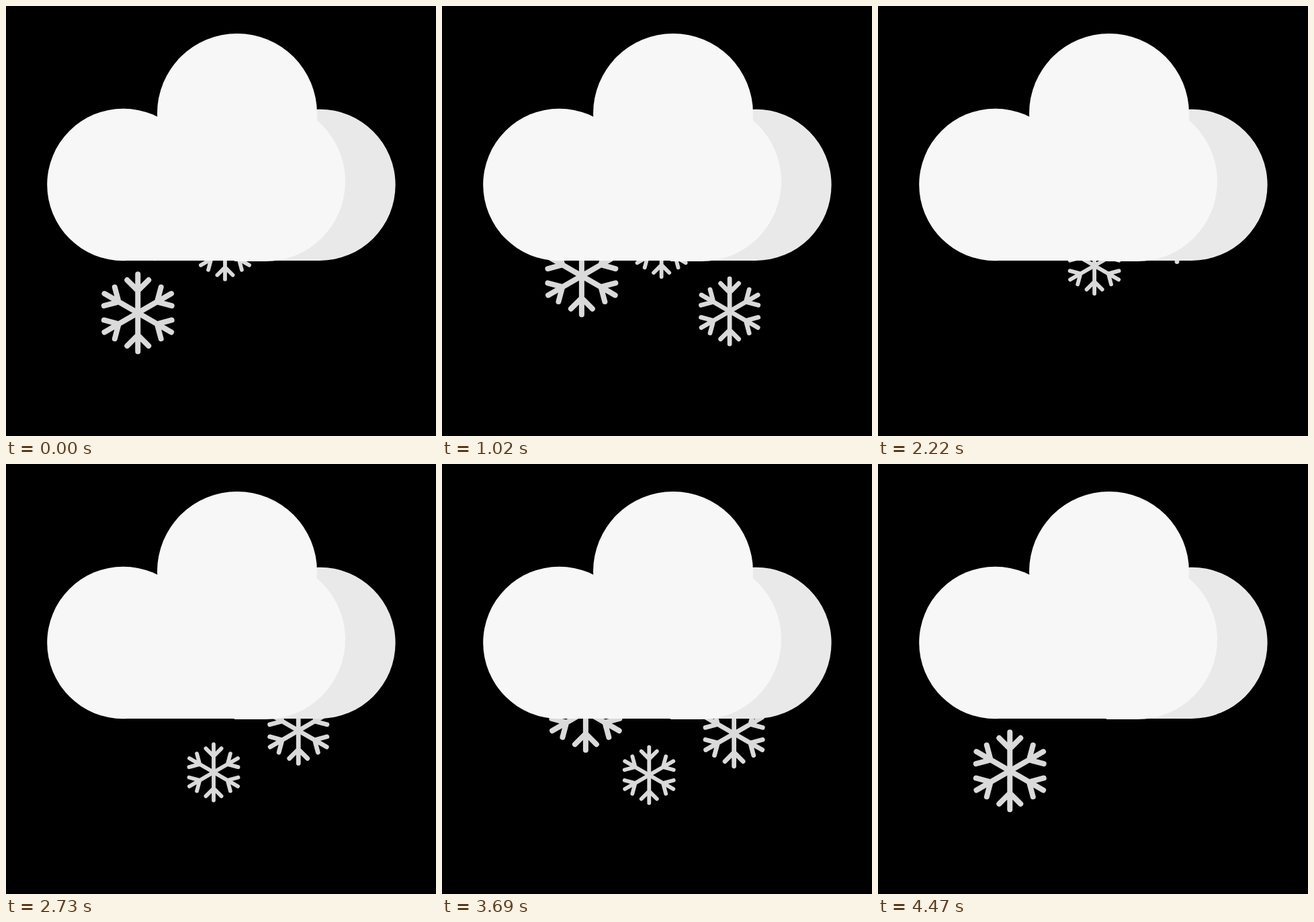
Recreate the animation shown at these times as an HTML page. Size 640 by 640 pixels, loop 4.5 s.

```html
<!DOCTYPE html>
<html>
<head>
<meta charset="utf-8">
<style>
  html, body { margin: 0; height: 100%; overflow: hidden; background: #000; }
  svg { display: block; width: 640px; height: 640px; }
</style>
</head>
<body>
<svg viewBox="0 0 640 640">
  <defs>
    <path id="arm" d="M0 0V-57.5M-16 -49L0 -33L16 -49"/>
    <g id="flake" fill="none" stroke="#dadada" stroke-width="8" stroke-linecap="round"></g>
  </defs>
  <g id="snow"></g>
  <g fill="#e9e9e9">
    <circle cx="467" cy="266.3" r="112.6"/>
    <rect x="386" y="200" width="81" height="179"/>
  </g>
  <g fill="#f7f7f7">
    <circle cx="174.5" cy="266" r="113.3"/>
    <circle cx="344" cy="160" r="119"/>
    <circle cx="386" cy="261" r="119"/>
    <rect x="174" y="200" width="212" height="179"/>
    <rect x="340" y="200" width="46" height="180"/>
  </g>
</svg>
<script>
const LOOP = 4500, STEP = 30, FADE = 14;

// x, y: pose at a launch time; speed/accel: fall over time; drift/curve: sideways shift over the fall
const kinds = [
  { scale: 1, x: 220, y: 328.5, end: 489, speed: 0.064, accel: 2.75e-5,
    drift: -0.14, curve: -0.00035, launches: [-1290, 180, 3180] },
  { scale: 0.724, x: 326, y: 365, end: 487, speed: 0.142, accel: 0,
    drift: -0.181, curve: 0, launches: [0, 1045, 2069, 3000] },
  { scale: 0.845, x: 445, y: 332, end: 496, speed: 0.108, accel: 3.75e-5,
    drift: -0.165, curve: 0.00022, launches: [150, 2220, 3150] }
];

const byId = id => document.getElementById(id);

function addUse(parent, href, transform = '') {
  const use = document.createElementNS('http://www.w3.org/2000/svg', 'use');
  use.setAttribute('href', href);
  use.setAttribute('transform', transform);
  return parent.appendChild(use);
}

for (let angle = 0; angle < 360; angle += 60)
  addUse(byId('flake'), '#arm', `rotate(${angle})`);

const flakes = kinds.flatMap(kind => kind.launches.map(launch =>
  ({ kind, launch, node: addUse(byId('snow'), '#flake') })));

function draw(now) {
  const time = Math.floor(now % LOOP / STEP) * STEP;
  for (const { kind, launch, node } of flakes) {
    const age = time - launch;
    const fall = kind.speed * age + kind.accel * age * age;
    const x = kind.x + kind.drift * fall + kind.curve * fall * fall;
    const y = kind.y + fall;
    const opacity = age < -400 ? 0 : Math.max(0, Math.min(1, (kind.end - y) / FADE));
    node.setAttribute('transform', `translate(${x} ${y}) scale(${kind.scale})`);
    node.setAttribute('opacity', opacity);
  }
}

function tick() {
  draw(performance.now());
  requestAnimationFrame(tick);
}
tick();
</script>
</body>
</html>
```
